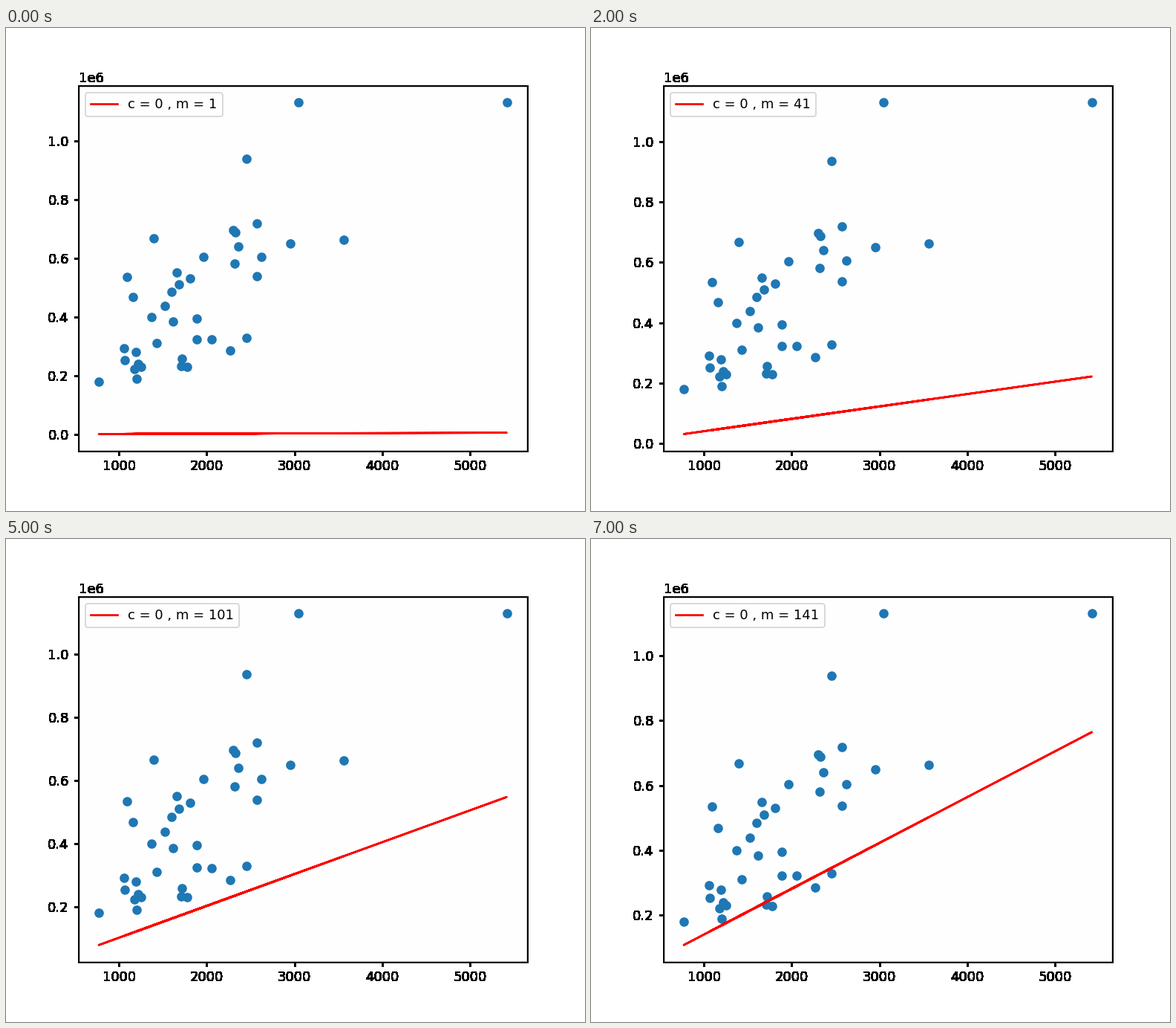
Write a matplotlib script that moves like this. It is 780 px wide and 650 px high and loops after 8000 ms.

```python
import numpy as np
import matplotlib.pyplot as plt
from matplotlib.animation import FuncAnimation

WIDTH, HEIGHT, DPI = 780, 650, 130
FRAMES, INTERVAL = 8, 1000
SLOPE_STEP = 20

area = np.array([
    1180, 2570, 770, 1960, 1680, 5420, 1715, 1060, 1780, 1890,
    3560, 1160, 1430, 1370, 1810, 2950, 1890, 1600, 1200, 1250,
    1620, 3050, 2270, 1070, 2450, 1710, 2450, 1400, 1520, 2570,
    2320, 1190, 2330, 1090, 2060, 2300, 1660, 2360, 1220, 2620])
price = 1000 * np.array([
    221.9, 538, 180, 604, 510, 1129.575, 257.5, 291.85, 229.5, 323,
    662.5, 468, 310, 400, 530, 650, 395, 485, 189, 230,
    385, 1129.575, 285, 252.7, 329, 233, 937, 667, 438, 719,
    580.5, 280, 687.5, 535, 322.5, 696, 550, 640, 240, 605])


def harden(img, dpi):
    """Make every touched pixel opaque, so edges outside the plot are crisp."""
    img[..., 3] = img[..., 3] > 0
    return np.round(img * 255).astype(np.uint8), 0, 0


fig, ax = plt.subplots(figsize=(WIDTH / DPI, HEIGHT / DPI), dpi=DPI,
                       facecolor="white")
fig.subplots_adjust(left=0.125, right=0.9, bottom=0.125, top=0.88)


def draw(i):
    c, m = 0, 1 + SLOPE_STEP * i
    ax.clear()
    ax.set_facecolor("#fefefe")
    ax.set_agg_filter(harden)
    ax.scatter(area, price)
    ax.plot(area, m * area + c, color="red", label=f"c = {c} , m = {m}")
    ax.legend(loc="upper left")
    return []


anim = FuncAnimation(fig, draw, frames=FRAMES, init_func=lambda: draw(0),
                     interval=INTERVAL, repeat=True, repeat_delay=0)
plt.show()
```
